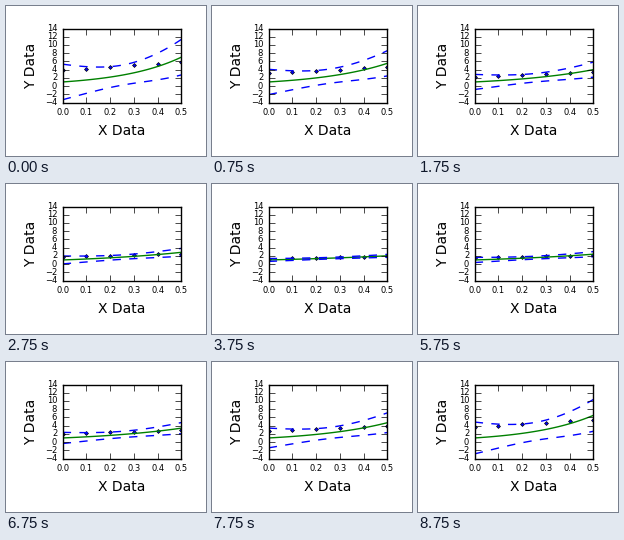
A matplotlib script that plays this animation: 200x150 px, repeating every 9 s.

```python
import numpy as np
import matplotlib.pyplot as plt
from matplotlib.animation import FuncAnimation

W, H, DPI = 200, 150, 100
FRAMES, INTERVAL = 36, 250
T_95 = 2.571  # Student t, 5 degrees of freedom

plt.style.use("classic")
plt.rcParams.update({
    "font.family": "DejaVu Sans",
    "figure.facecolor": "white",
    "savefig.facecolor": "white",
    "savefig.dpi": DPI,
    "xtick.labelsize": 6,
    "ytick.labelsize": 6,
    "axes.labelsize": 10,
})

x_data = np.linspace(0, 0.5, 6)
x_fit = np.linspace(0, 0.5, 101)


def fit_rate(x, y):
    """Least-squares k for y = exp(k x), by Gauss-Newton."""
    k = 2.0
    for _ in range(40):
        model = np.exp(k * x)
        grad = x * model
        k += grad @ (y - model) / (grad @ grad)
    return k


def half_width(x, y, k, at):
    """Half width of the 95% confidence band."""
    n = len(x)
    s = np.sqrt(np.sum((y - np.exp(k * x)) ** 2) / (n - 1))
    dev = x - x.mean()
    return T_95 * s * np.sqrt(1 / n + (at - x.mean()) ** 2 / (dev @ dev))


fig, ax = plt.subplots(figsize=(W / DPI, H / DPI), dpi=DPI)
ax.set_xlim(0, 0.5)
ax.set_ylim(-4, 14)
ax.set_xticks(np.arange(6) / 10)
ax.set_yticks(range(-4, 15, 2))
ax.set_xlabel("X Data")
ax.set_ylabel("Y Data")
fig.tight_layout()

points, = ax.plot([], [], "bD", markersize=2)
curve, = ax.plot([], [], "g-")
upper, = ax.plot([], [], "b--")
lower, = ax.plot([], [], "b--")


def update(i):
    scale = np.exp(0.075 * abs(FRAMES // 2 - i))
    y = scale * (1 + x_data)
    k = fit_rate(x_data, y)
    mid = np.exp(k * x_fit)
    band = half_width(x_data, y, k, x_fit)
    points.set_data(x_data, y)
    curve.set_data(x_fit, mid)
    upper.set_data(x_fit, mid + band)
    lower.set_data(x_fit, mid - band)
    return points, curve, upper, lower


anim = FuncAnimation(fig, update, frames=FRAMES, interval=INTERVAL,
                     repeat=True, repeat_delay=0)
plt.show()
```
